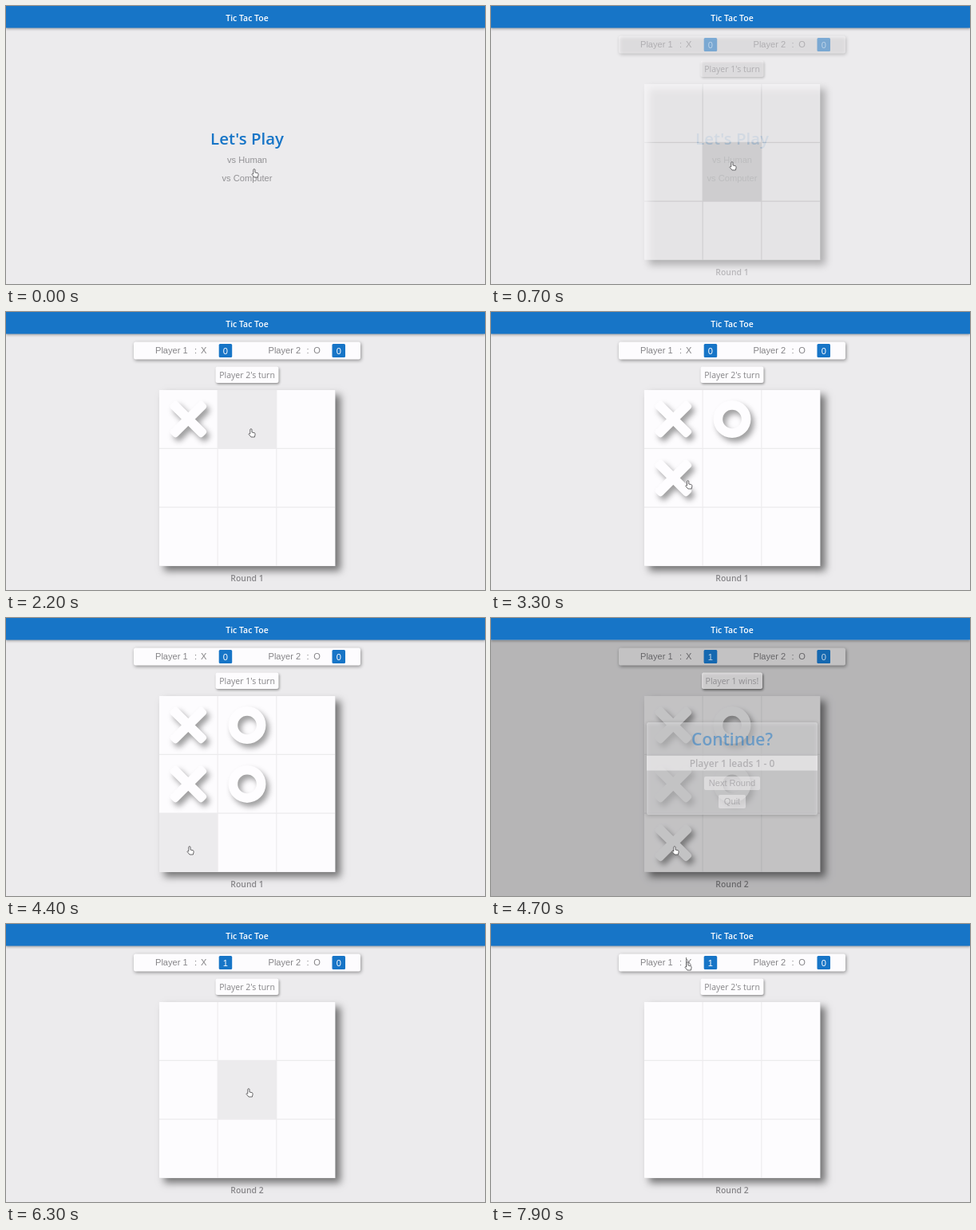
An HTML page with a canvas for the animation above (8 s loop, 600 by 349 pixels).

```html
<!DOCTYPE html>
<html lang="en">
<head>
<meta charset="utf-8">
<title>Tic Tac Toe</title>
<style>
html, body { margin: 0; width: 100%; height: 100%; overflow: hidden; background: #ecebed; }
canvas { display: block; }
</style>
</head>
<body>
<canvas id="stage" width="600" height="349"></canvas>
<script>
const ctx = document.getElementById('stage').getContext('2d');
const LOOP = 8000, STEP = 100;
const BLUE = '#1775c7', BG = '#ecebed', WHITE = '#fdfcfe', GREY = '#858487';
const UI = '"Open Sans", "Noto Sans", sans-serif';
const PLAIN = '11.1px "Liberation Sans", Arial, sans-serif';
const semi = size => `600 ${size}px ${UI}`;

// Pointer keyframes: time, x, y
const path = [
  [0, 311, 205], [100, 303, 197], [200, 303, 197], [300, 302, 196], [1100, 302, 196],
  [1300, 261, 167], [1500, 228, 143], [1800, 228, 143], [2200, 307, 147], [2700, 307, 147],
  [3100, 228, 212], [3200, 228, 212], [3600, 303, 212], [3900, 303, 212], [4400, 230, 287],
  [4900, 230, 287], [5400, 304, 207], [6300, 304, 207], [7000, 246, 48], [8000, 246, 48]
];
// Moves: time, column, row, mark
const moves = [[1900, 0, 0, 'X'], [2600, 1, 0, 'O'], [3300, 0, 1, 'X'], [3900, 1, 1, 'O'], [4700, 0, 2, 'X']];
const WIN = 4700, NEXT = 6300;

function pointerAt(t) {
  const i = path.findIndex(k => k[0] > t);
  const [t0, x0, y0] = path[i - 1], [t1, x1, y1] = path[i];
  const p = (t - t0) / (t1 - t0);
  return [x0 + (x1 - x0) * p, y0 + (y1 - y0) * p];
}

function shadow(dx, dy, blur, alpha) {
  ctx.shadowOffsetX = dx;
  ctx.shadowOffsetY = dy;
  ctx.shadowBlur = blur;
  ctx.shadowColor = `rgba(0,0,0,${alpha})`;
}

function box(x, y, w, h, color, radius = 0, shade) {
  ctx.save();
  if (shade) shadow(...shade);
  ctx.fillStyle = color;
  ctx.beginPath();
  ctx.roundRect(x, y, w, h, radius);
  ctx.fill();
  ctx.restore();
}

function text(str, x, y, font, color, align = 'center') {
  ctx.font = font;
  ctx.fillStyle = color;
  ctx.textAlign = align;
  ctx.fillText(str, x, y);
}

function drawMark(mark, x, y) {
  ctx.save();
  ctx.translate(x, y);
  shadow(4, 5, 7, 0.38);
  ctx.fillStyle = '#fefdff';
  ctx.beginPath();
  if (mark === 'O') {
    ctx.arc(0, 0, 23.5, 0, 7);
    ctx.moveTo(11.8, 0);
    ctx.arc(0, 0, 11.8, 0, 2 * Math.PI, true);
    ctx.fill('evenodd');
  } else {
    const bar = new Path2D(), cross = new Path2D();
    bar.roundRect(-28.5, -6, 57, 12, 4);
    for (const angle of [45, -45]) cross.addPath(bar, new DOMMatrix().rotate(angle));
    ctx.fill(cross);
  }
  ctx.restore();
}

const badge = (x, score) => {
  box(x, 40, 16.5, 17, BLUE, 1.5);
  text(score, x + 8.25, 52.5, PLAIN, '#fff');
};

function drawScores(score) {
  badge(266.7, score);
  badge(408.5, 0);
}

function drawStatus(str) {
  const wide = str.endsWith('turn');
  box(wide ? 262.5 : 264, 68.5, wide ? 79 : 76, 20.5, WHITE, 2.5, [1, 1.5, 3, 0.4]);
  text(str, 302, 83, `10.5px ${UI}`, GREY);
}

function drawGame(t, px, py) {
  const placed = t < NEXT ? moves.filter(m => m[0] <= t) : [];
  const won = t >= WIN, score = won ? 1 : 0;
  const status = won && t < NEXT ? 'Player 1 wins!'
    : `Player ${t >= NEXT || placed.length % 2 ? 2 : 1}'s turn`;

  box(160, 37.5, 284, 22, WHITE, 2.5, [1, 1.5, 4, 0.4]);
  [['Player 1', 187], [':', 236], ['X', 244], ['Player 2', 328.5], [':', 376.5], ['O', 385.3]]
    .forEach(([str, x]) => text(str, x, 52, PLAIN, GREY, 'left'));
  drawScores(score);
  drawStatus(status);

  box(192, 98, 220.5, 221, BG, 0, [6, 6, 9, 0.5]);
  for (let i = 0; i < 9; i++) {
    const col = i % 3, row = (i - col) / 3;
    const x = 192 + col * 73.7, y = 98 + row * 73.9;
    const taken = placed.some(m => m[1] === col && m[2] === row);
    const open = !won || t >= NEXT;
    const inside = px >= x && px < x + 73.7 && py + 5 >= y && py + 5 < y + 73.9;
    if (taken || !open || !inside) box(x, y, 72.6, 72.7, WHITE);
  }
  for (const [, col, row, mark] of placed) drawMark(mark, 228.3 + col * 73.7, 134.5 + row * 73.9);
  text(`Round ${score + 1}`, 302, 338, semi(10.4), GREY);

  if (won && t < NEXT) drawDialog(t, status);
}

function drawDialog(t, status) {
  ctx.save();
  ctx.globalAlpha = t < WIN + STEP ? 0.5 : 1;
  box(0, 28, 600, 321, 'rgba(0,0,0,.46)');
  drawScores(1);
  drawStatus(status);
  box(195, 131, 214, 116, BG, 2.5, [0, 1, 5, 0.4]);
  text('Continue?', 302, 160, semi(21), BLUE);
  box(195, 173, 214, 18.5, WHITE);
  text('Player 1 leads 1 - 0', 302, 187, semi(12), GREY);
  box(267, 199, 70, 17, '#f5f4f6', 2);
  text('Next Round', 302, 211, PLAIN, t >= 5300 ? '#757477' : GREY);
  box(285, 222, 34, 17, '#f5f4f6', 2);
  text('Quit', 302, 234, PLAIN, GREY);
  ctx.restore();
}

function drawMenu() {
  text("Let's Play", 302, 174, semi(20.4), BLUE);
  text('vs Human', 302, 197, PLAIN, '#929194');
  text('vs Computer', 302, 220, PLAIN, '#929194');
}

const hand = new Path2D('M-1.2 6V.8a1.1 1.1 0 0 1 2.2 0V4L4 4.6Q5.4 5 5.1 6.8L4.4 10H0L-3 6.4Q-2.8 5-1.2 6Z');

function drawPointer(x, y) {
  ctx.save();
  ctx.translate(x, y);
  ctx.fillStyle = '#fff';
  ctx.strokeStyle = '#58575a';
  ctx.lineWidth = 0.9;
  ctx.fill(hand);
  ctx.stroke(hand);
  ctx.restore();
}

function draw(t) {
  const [px, py] = pointerAt(t);
  box(0, 0, 600, 349, BG);
  if (t < 800) {
    ctx.globalAlpha = t < 700 ? 1 : 0.5;
    drawMenu();
  }
  if (t >= 700) {
    ctx.globalAlpha = t < 800 ? 0.5 : 1;
    drawGame(t, px, py);
  }
  ctx.globalAlpha = 1;
  box(0, 0, 600, 27.5, BLUE, 0, [0, 1, 3, 0.3]);
  text('Tic Tac Toe', 302, 18.5, semi(10.5), '#fff');
  // Blinking text caret
  if (t >= 7000 && (t < 7400 || t >= 7900)) box(244, 42, 1, 13, '#777');
  drawPointer(px, py);
}

const start = performance.now();
function tick() {
  const t = (performance.now() - start) % LOOP;
  draw(Math.floor(t / STEP) * STEP);
  requestAnimationFrame(tick);
}
tick();
</script>
</body>
</html>
```
